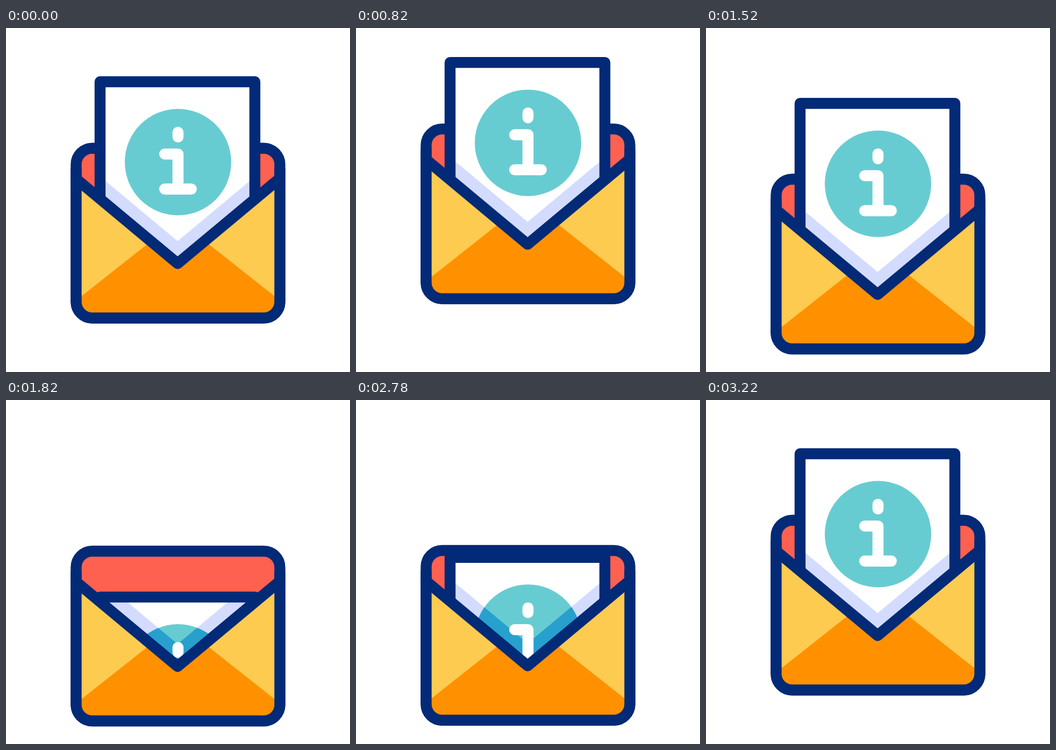
These frames come from a looping animation (640x640 px, 3.54 s). An HTML page with a canvas:

```html
<!DOCTYPE html>
<html lang="en">
<head>
<meta charset="utf-8">
<title>Info letter</title>
<style>
html, body { margin: 0; width: 100%; height: 100%; overflow: hidden; background: #fff; }
canvas { display: block; width: 640px; height: 640px; }
</style>
</head>
<body>
<canvas id="stage" width="640" height="640"></canvas>
<script>
const ctx = document.getElementById('stage').getContext('2d');
const LOOP = 3540;
const NAVY = '#032a76', RED = '#ff6150', YELLOW = '#fdcb50', ORANGE = '#ff9100';
const TEAL = '#67ccd1', DEEP = '#27a0ce', SHADE = '#d3dcff', WHITE = '#fff';

const MID = 320, LEFT = 130.5, RIGHT = 509.5, TOP = 223.7, BOTTOM = 539.5;
const PEN = 20.4;
const PAPER_LEFT = 175, PAPER_RIGHT = 463, PAPER_TOP = 100, PAPER_END = 600;

function ease(t, from, to) {
  const s = Math.min(1, Math.max(0, (t - from) / (to - from)));
  return s * s * (3 - 2 * s);
}

// The envelope hops up, drops and returns.
const bodyY = t => -52.5 * ease(t, 185, 600) + 110 * ease(t, 600, 1500) - 57.5 * ease(t, 2740, 3212);

// The letter lifts a little, sinks inside and comes back out.
const letterY = t => -35 * ease(t, 1140, 1440) + 335.5 * ease(t, 1440, 2020) - 300.5 * ease(t, 2418, 3102);

// A V across the envelope with its point at height y.
function vee(y, slope = 0.834, x = 319.3) {
  return [[LEFT, y - slope * (x - LEFT)], [x, y], [RIGHT, y - slope * (RIGHT - x)]];
}

const FLAP = vee(438.2);

function trace(points) {
  ctx.beginPath();
  points.forEach(([x, y]) => ctx.lineTo(x, y));
}

function fillPoly(points, color) {
  trace(points);
  ctx.fillStyle = color;
  ctx.fill();
}

function line(points, color, width) {
  trace(points);
  ctx.strokeStyle = color;
  ctx.lineWidth = width;
  ctx.stroke();
}

function trimmed(points, from, to, color, width) {
  if (to - from < 0.001) return;
  const len = points.slice(1).reduce((sum, [x, y], i) =>
    sum + Math.hypot(x - points[i][0], y - points[i][1]), 0);
  ctx.setLineDash([(to - from) * len, len * 3]);
  ctx.lineDashOffset = -from * len;
  line(points, color, width);
  ctx.setLineDash([]);
}

function clipped(path, paint) {
  ctx.save();
  path();
  ctx.clip();
  paint();
  ctx.restore();
}

function box() {
  ctx.beginPath();
  ctx.roundRect(LEFT, TOP, RIGHT - LEFT, BOTTOM - TOP, 30);
}

function outline() {
  box();
  ctx.strokeStyle = NAVY;
  ctx.lineWidth = PEN;
  ctx.stroke();
}

function disc(y, color) {
  ctx.beginPath();
  ctx.arc(MID, y, 99, 0, Math.PI * 2);
  ctx.fillStyle = color;
  ctx.fill();
}

function drawBack() {
  box();
  ctx.fillStyle = RED;
  ctx.fill();
  outline();
}

function drawRays(t) {
  const head = ease(t, 1960, 2180), tail = ease(t, 2100, 2350);
  for (let k = -1; k <= 1; k++) {
    const from = [316 + 39 * k, 358];
    const to = [316.5 + 63 * k, 313.5 + 18 * k * k + 4.5 * k];
    trimmed([from, to], tail, head, YELLOW, 21);
  }
}

function drawGlyph(t) {
  const head = ease(t, 840, 1080), tail = ease(t, 1160, 1420);
  const x = 295.3, y = 234.5, foot = 299.6;
  const strokes = [
    [[MID, 194], [MID, 202.8]],
    [[x, y], [MID, y], [MID, foot]],
    [[x, foot], [2 * MID - x, foot]]
  ];
  strokes.forEach(p => line(p, WHITE, 20.6));
  strokes.forEach(p => trimmed(p, tail, head, YELLOW, 23.4));
}

function drawLetter(t) {
  const dy = letterY(t), top = PAPER_TOP + dy;
  const shade = [...vee(396.5), [RIGHT, PAPER_END], [LEFT, PAPER_END]];
  const sheet = () => {
    ctx.beginPath();
    ctx.rect(PAPER_LEFT, top, PAPER_RIGHT - PAPER_LEFT, PAPER_END);
  };

  sheet();
  ctx.fillStyle = WHITE;
  ctx.fill();
  clipped(sheet, () => fillPoly(shade, SHADE));
  disc(249.5 + dy, TEAL);
  clipped(() => trace(shade), () => disc(249.5 + dy, DEEP));

  ctx.save();
  ctx.translate(0, dy);
  drawGlyph(t);
  ctx.restore();

  const end = top + PAPER_END;
  line([[PAPER_LEFT, end], [PAPER_LEFT, top], [PAPER_RIGHT, top], [PAPER_RIGHT, end]], NAVY, PEN);
}

function drawFront() {
  const below = [...FLAP, [RIGHT, BOTTOM], [LEFT, BOTTOM]];
  clipped(box, () => {
    fillPoly(below, YELLOW);
    clipped(() => trace(below), () =>
      fillPoly([...vee(357, -0.79, MID), [RIGHT, BOTTOM], [LEFT, BOTTOM]], ORANGE));
  });
  line(FLAP, NAVY, PEN);
  // Only the lower border passes in front of the letter.
  clipped(() => {
    ctx.beginPath();
    ctx.rect(0, FLAP[0][1] - 20, 640, 400);
  }, outline);
}

function draw(t) {
  ctx.fillStyle = WHITE;
  ctx.fillRect(0, 0, 640, 640);
  ctx.lineCap = ctx.lineJoin = 'round';
  ctx.save();
  ctx.translate(0, bodyY(t));
  drawBack();
  drawRays(t);
  clipped(() => trace([[LEFT, -300], ...FLAP, [RIGHT, -300]]), () => drawLetter(t));
  drawFront();
  ctx.restore();
}

const start = performance.now();
function tick() {
  draw((performance.now() - start) % LOOP);
  requestAnimationFrame(tick);
}
tick();
</script>
</body>
</html>
```
